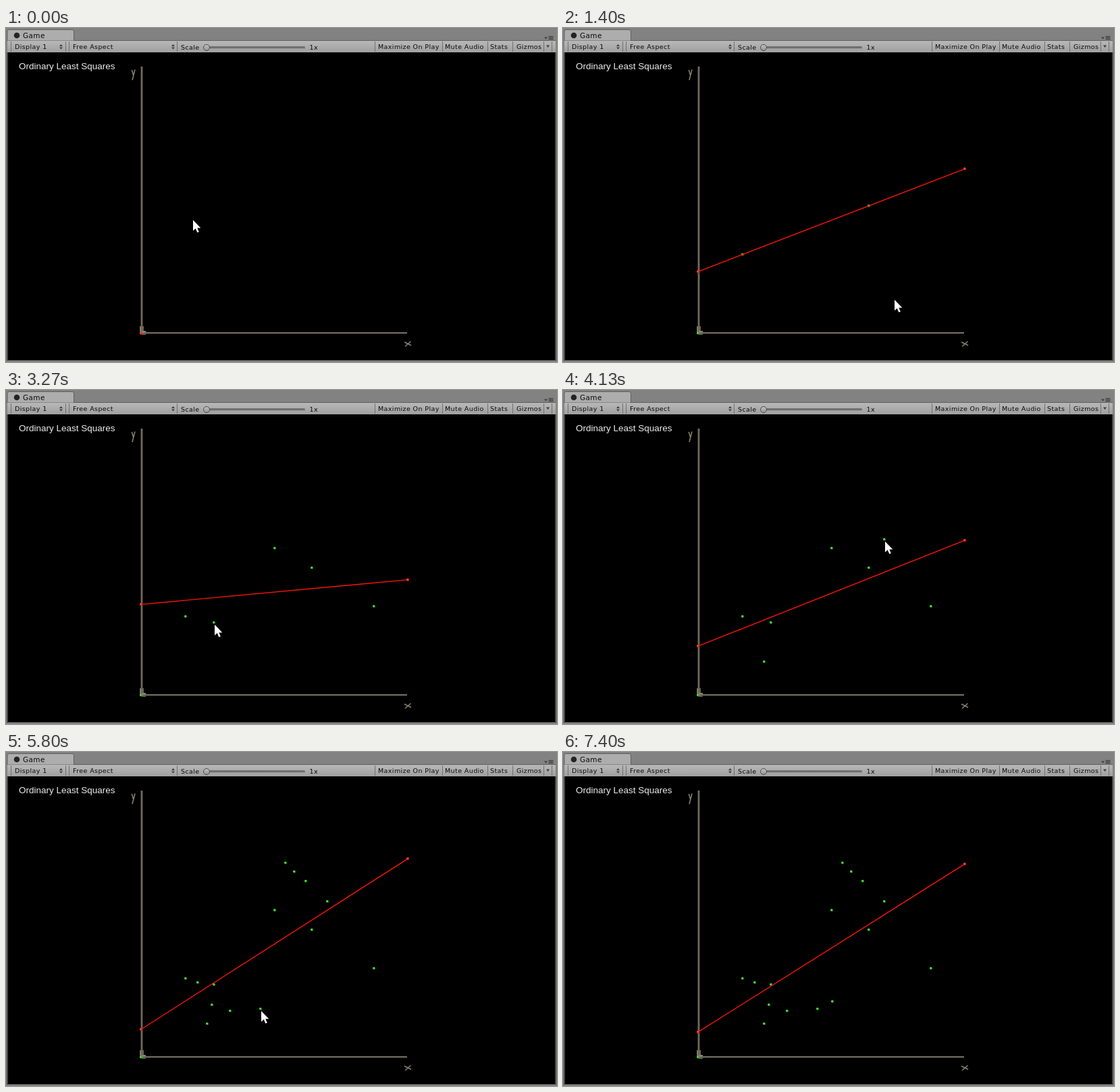
Animation, 816 px wide and 494 px high, one loop 8190 ms. Source, as an HTML page:

```html
<!DOCTYPE html>
<html lang="en">
<head>
<meta charset="utf-8">
<title>Ordinary Least Squares</title>
<style>
  html, body { margin: 0; width: 100%; height: 100%; overflow: hidden; background: #828282; }
  svg { display: block; width: 100%; height: 100%; }
  .ui { font: 9.5px "DejaVu Sans", sans-serif; letter-spacing: .4px; fill: #0a0a0a; }
  .tab { font-size: 10.5px; }
  .title { font: 13.5px "Liberation Sans", Arial, sans-serif; fill: #ececec; }
  .glyph { fill: none; stroke: #857f70; stroke-width: 1.6; }
</style>
</head>
<body>
<svg viewBox="0 0 816 494">
  <defs>
    <linearGradient id="bar" x2="0" y2="1">
      <stop stop-color="#b8b8b8"/><stop offset="1" stop-color="#a0a0a0"/>
    </linearGradient>
    <linearGradient id="knob" x2="0" y2="1">
      <stop stop-color="#c4c4c4"/><stop offset="1" stop-color="#929292"/>
    </linearGradient>
  </defs>

  <!-- Window chrome -->
  <rect width="816" height="494" fill="#828282"/>
  <path d="M2 19V5Q2 2.5 4.5 2.5H98Q100.5 2.5 100.5 5V19Z" fill="#adadad" stroke="#606060"/>
  <rect x="2" y="19" width="812" height="17" fill="url(#bar)"/>
  <path d="M100 18.5H814" stroke="#5e5e5e"/>
  <rect x="1" y="36" width="814" height="456" fill="#4a4a4a"/>
  <rect x="3" y="36" width="810" height="455" fill="#000"/>
  <circle cx="16" cy="11" r="4.3" fill="#242424"/>
  <path id="seps" stroke="#707070"/>
  <g fill="#3c3c3c">
    <path id="arrows"/>
    <path d="M800 25.5h5l-2.5 3.5zM797 13.5h5l-2.5 3z"/>
    <path d="M803.5 12.5h7M803.5 14.5h7M803.5 16.5h7" stroke="#303030"/>
  </g>
  <rect x="294" y="27" width="149" height="4" rx="2" fill="#707070"/>
  <path d="M298 30.5H442" stroke="#989898"/>
  <circle cx="297" cy="29" r="4.5" fill="url(#knob)" stroke="#4c4c4c"/>
  <g class="ui">
    <text class="tab" x="25" y="15">Game</text>
    <text x="13" y="31">Display 1</text>
    <text x="99" y="31">Free Aspect</text>
    <text x="259" y="32">Scale</text>
    <text x="449.5" y="32">1x</text>
    <text x="551" y="31">Maximize On Play</text>
    <text x="650" y="31">Mute Audio</text>
    <text x="717" y="31">Stats</text>
    <text x="756" y="31">Gizmos</text>
  </g>

  <!-- Chart -->
  <text class="title" x="19" y="61">Ordinary Least Squares</text>
  <rect x="199.5" y="57" width="3" height="386" fill="#5c5749"/>
  <path d="M201 57V443" stroke="#857f70"/>
  <rect x="204" y="450" width="390" height="2" fill="#7a7466"/>
  <path class="glyph" d="M186.3 62L188.7 70M191 61.5L187 77"/>
  <path class="glyph" d="M590 464.5L600 469.5M599.5 463.5L591 471"/>
  <rect x="198" y="441" width="6" height="11" fill="#6a6556"/>
  <path d="M199.5 442V450" stroke="#8f8a7b"/>
  <rect x="201" y="448" width="6" height="5.5" fill="#8a8576"/>
  <rect x="203" y="450.5" width="4" height="3" fill="#646051"/>

  <g id="dots"></g>
  <path id="fit" fill="none" stroke="#f81808" stroke-width="1.4"/>
  <g id="ends"></g>
  <path id="cursor" d="M0 0V16L3.7 12.6L6.3 18.4L8.8 17.4L6.3 11.7H11.3Z"
        fill="#fff" stroke="#000" stroke-width="1.2" paint-order="stroke"/>
</svg>
<script>
const $ = id => document.getElementById(id);
const LOOP = 8190, TICK = 200 / 3;
const TRAVEL = 3;   // longest pointer move, in ticks
const X0 = 200, X1 = 595, ORIGIN_Y = 451.5;

$("seps").setAttribute("d", [7, 88, 93, 253, 546, 646, 713, 750, 796, 808]
  .map(x => `M${x + .5} 20V35`).join(""));
$("arrows").setAttribute("d", [79, 245]
  .map(x => `M${x} 27h5l-2.5 -3zM${x} 28.5h5l-2.5 3z`).join(""));

// Clicks that add a point: tick, x, y
const clicks = [
  [8, 266, 335], [16, 453, 263], [31, 545, 320], [40, 398, 234], [45, 308, 344],
  [54, 298, 402], [62, 476, 221], [65, 444, 191], [68, 427, 177], [71, 414, 164],
  [78, 284, 341], [81, 305, 374], [83, 332, 383], [87, 377, 380], [96, 399, 369]
];

// Places the pointer swings past between clicks
const swings = [
  [0, 277, 284], [4, 284, 353], [10, 299, 333], [21, 491, 402], [26, 569, 294],
  [35, 470, 402], [74, 374, 221], [91, 420, 136], [107, 437, 273], [111, 0, 520]
];

// The pointer reaches a point one tick before clicking it
const stops = clicks
  .flatMap(([k, x, y]) => [[k - 1, x + 1, y + 3], [k, x + 1, y + 3]])
  .concat(swings)
  .sort((a, b) => a[0] - b[0]);

function pointer(tick) {
  const i = stops.findIndex(s => s[0] > tick);
  if (i < 0) return stops[stops.length - 1].slice(1);
  const [ka, xa, ya] = stops[i - 1], [kb, xb, yb] = stops[i];
  const from = Math.max(ka, kb - TRAVEL);
  const u = Math.max(0, (tick - from) / (kb - from));
  return [Math.round(xa + (xb - xa) * u), Math.round(ya + (yb - ya) * u)];
}

function add(parent, tag, attrs) {
  const el = document.createElementNS("http://www.w3.org/2000/svg", tag);
  for (const k in attrs) el.setAttribute(k, attrs[k]);
  return parent.appendChild(el);
}

function ball(parent, x, y, fill, shade) {
  const g = add(parent, "g", { transform: `translate(${x} ${y})` });
  add(g, "circle", { r: 2.1, fill: shade });
  add(g, "circle", { cx: -.4, cy: -.4, r: 1.4, fill });
  return g;
}
const green = (x, y) => ball($("dots"), x, y, "#52ee3c", "#1f8a14");
const red = () => ball($("ends"), X0, ORIGIN_Y, "#ff4a36", "#e01608");
const show = (el, on) => el.setAttribute("visibility", on ? "visible" : "hidden");
const move = (el, at) => el.setAttribute("transform", `translate(${at})`);

const dots = clicks.map(([, x, y]) => green(x, y));
const base = green(X0, ORIGIN_Y);
const ends = [red(), red()];

// The slope sums leave out the first point; the means include it
function fitLine(list) {
  const mean = k => list.reduce((sum, p) => sum + p[k], 0) / list.length;
  const mx = mean(1), my = mean(2);
  let sxy = 0, sxx = 0;
  for (const [, x, y] of list.slice(1)) {
    sxy += (x - mx) * (y - my);
    sxx += (x - mx) ** 2;
  }
  return x => my + (x - mx) * sxy / sxx;
}

function draw(ms) {
  const tick = Math.floor((ms % LOOP + 3.34) / TICK);
  const shown = clicks.filter(c => c[0] <= tick);
  const fitted = shown.length > 1;
  dots.forEach((d, i) => show(d, i < shown.length));
  show(base, fitted);

  const line = fitLine(shown);
  const tips = [X0, X1].map(x => fitted ? [x, line(x)] : [X0, ORIGIN_Y]);
  ends.forEach((e, i) => move(e, tips[i]));
  $("fit").setAttribute("d", fitted ? `M${tips[0]}L${tips[1]}` : "");
  move($("cursor"), pointer(tick));
}

const start = performance.now();
function loop() {
  draw(performance.now() - start);
  requestAnimationFrame(loop);
}
loop();
</script>
</body>
</html>
```
